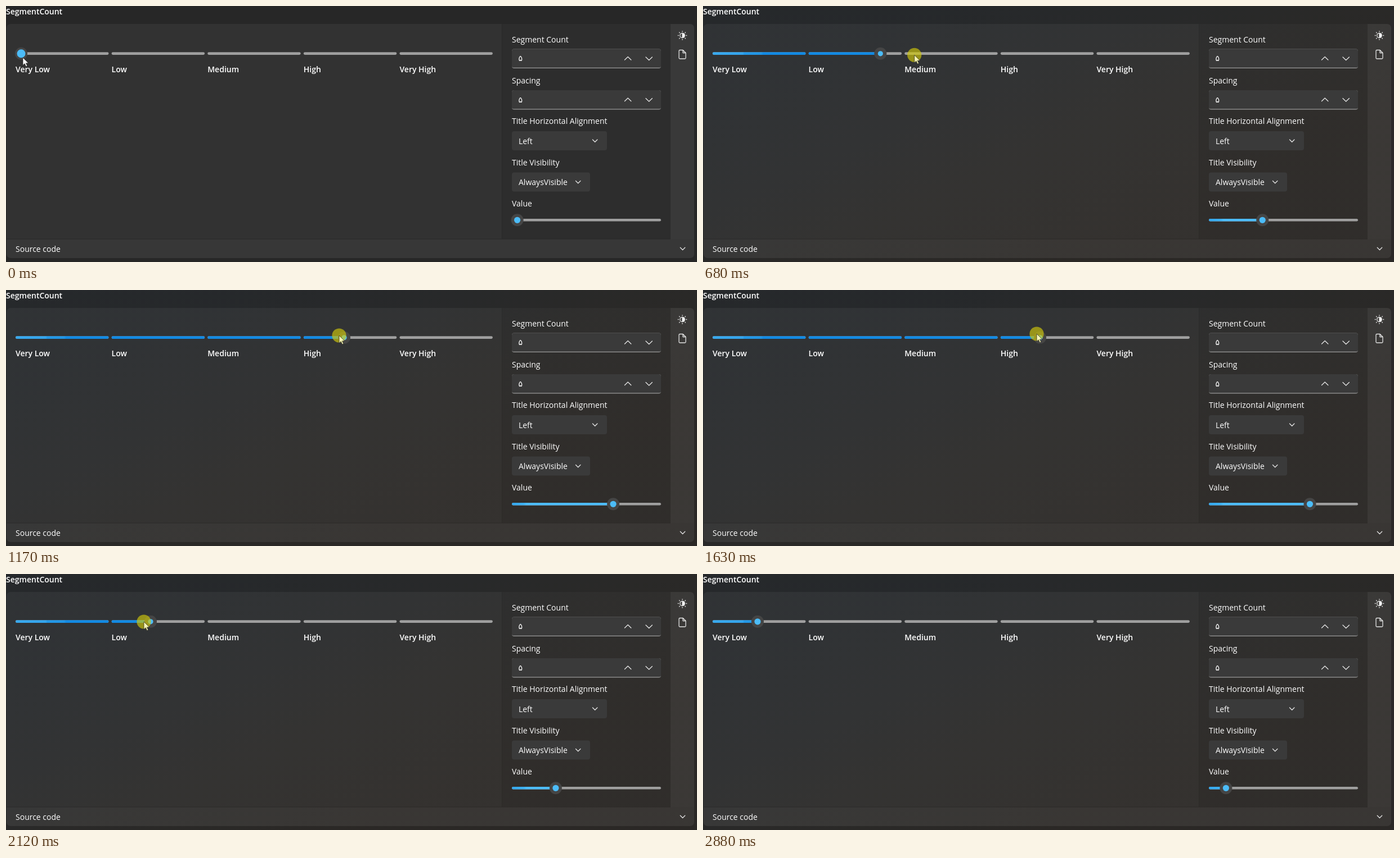
Animation of 1228 by 456 pixels, one loop 3220 ms. Source, as an HTML page:

```html
<!DOCTYPE html>
<html lang="en">
<head>
<meta charset="utf-8">
<title>SegmentCount</title>
<style>
  html, body { margin: 0; width: 100%; height: 100%; overflow: hidden; background: #272727; }
  svg { display: block; width: 1228px; height: 456px; }
  text { font: 14px "Open Sans", "Noto Sans", sans-serif; fill: #fff; }
  .bold { font-weight: 600; }
  .digit { font: 14px "DejaVu Sans", sans-serif; }
  .box { fill: #3a3a3a; }
  .track { fill: #9f9f9f; }
  .ring { fill: #454545; }
  .dot { fill: #4cbcf8; }
  .icon { fill: none; stroke: #e4e4e4; stroke-width: 1.3; stroke-linecap: round; stroke-linejoin: round; }
</style>
</head>
<body>
<svg viewBox="0 0 1228 456">
  <defs>
    <clipPath id="panel"><rect x="1" y="32" width="1222" height="417" rx="7"/></clipPath>
    <clipPath id="segments"></clipPath>
    <clipPath id="valueTrack"><rect x="899" y="379" width="265" height="4.6" rx="2.3"/></clipPath>
    <linearGradient id="mainFill" gradientUnits="userSpaceOnUse" x1="17" x2="117" y1="0" y2="0">
      <stop offset="0" stop-color="#38a9ee"/>
      <stop offset=".54" stop-color="#33a4ec"/>
      <stop offset=".56" stop-color="#2398e6"/>
      <stop offset=".86" stop-color="#2095e5"/>
      <stop offset=".9" stop-color="#128ae3"/>
    </linearGradient>
    <linearGradient id="valueFill" gradientUnits="userSpaceOnUse" x1="899" x2="925" y1="0" y2="0">
      <stop offset="0" stop-color="#35a8ee"/>
      <stop offset=".8" stop-color="#3db1f2"/>
      <stop offset="1" stop-color="#4cbcf8"/>
    </linearGradient>
    <linearGradient id="mica" gradientUnits="userSpaceOnUse" x1="420" y1="0" x2="620" y2="456">
      <stop offset="0" stop-color="#1d3a55" stop-opacity=".09"/>
      <stop offset=".35" stop-color="#33404a" stop-opacity=".08"/>
      <stop offset=".6" stop-color="#4a4030" stop-opacity=".08"/>
      <stop offset="1" stop-color="#4a3018" stop-opacity=".1"/>
    </linearGradient>
  </defs>

  <rect width="1228" height="456" fill="#272727"/>
  <g clip-path="url(#panel)">
    <rect y="32" width="882" height="383" fill="#323232"/>
    <rect x="881" y="32" width="300" height="383" fill="#2d2d2d"/>
    <rect x="1181" y="32" width="43" height="383" fill="#393939"/>
    <rect y="415" width="1228" height="35" fill="#373737"/>
    <path d="M0 415H1181M881.5 32V415" stroke="#292929"/>
  </g>
  <rect id="tint" width="1228" height="456" fill="url(#mica)"/>

  <text class="bold" x="0" y="15">SegmentCount</text>
  <text x="17" y="438">Source code</text>
  <text x="899" y="65">Segment Count</text>
  <text x="899" y="138">Spacing</text>
  <text x="899" y="210">Title Horizontal Alignment</text>
  <text x="899" y="283.5">Title Visibility</text>
  <text x="899" y="357">Value</text>

  <g id="inputs"></g>
  <rect class="box" x="899" y="223" width="169" height="34" rx="4"/>
  <text x="911" y="246">Left</text>
  <rect class="box" x="899" y="296.5" width="139" height="34" rx="4"/>
  <text x="911" y="319">AlwaysVisible</text>

  <g class="icon">
    <path d="M1042.5 238l4.2 4.2l4.2-4.2M1012.5 311.5l4.2 4.2l4.2-4.2M1198.3 430.3l4.2 4.2l4.2-4.2"/>
    <circle cx="1202" cy="52.5" r="4.2"/>
    <path d="M1202 48.5a4 4 0 0 1 0 8z" fill="#fff"/>
    <g id="rays"></g>
    <path d="M1197.5 78.5h5.5l5 5v9a1.5 1.5 0 0 1-1.5 1.5h-9a1.5 1.5 0 0 1-1.5-1.5v-12.500a1.500 1.500 0 0 1 1.500-1.500zM1203 78.500v5h5"/>
  </g>

  <g id="tracks"></g>
  <rect clip-path="url(#segments)" id="mainBar" x="17" y="82" height="6" fill="url(#mainFill)"/>
  <rect class="track" x="899" y="379" width="265" height="4.6" rx="2.3"/>
  <rect clip-path="url(#valueTrack)" id="valueBar" x="899" y="378" height="7" fill="url(#valueFill)"/>

  <g id="mainThumb">
    <circle class="ring" r="11"/>
    <circle class="dot" id="mainDot" r="7.5"/>
  </g>
  <g id="valueThumb">
    <circle class="ring" r="11"/>
    <circle class="dot" r="5.6"/>
  </g>

  <g id="cursor">
    <circle id="halo" r="12.6" fill="#d1ca0b" fill-opacity=".65"/>
    <path id="arrow" d="M0 0V13.600l3.200-3l2.300 5.200l2.300-1l-2.300-5h4.400z" stroke="#222" stroke-width=".7"/>
  </g>
</svg>
<script>
const $ = id => document.getElementById(id);
const LOOP = 3220;

// Static repeated parts
const rect = (i, cls) =>
  `<rect ${cls} x="${17 + i * 170.6}" y="82.3" width="165.5" height="4.6" rx="2.3"/>`;
['Very Low', 'Low', 'Medium', 'High', 'Very High'].forEach((label, i) => {
  $('segments').innerHTML += rect(i, '');
  $('tracks').innerHTML += rect(i, 'class="track"') +
    `<text class="bold" x="${17 + i * 170.6}" y="117.5">${label}</text>`;
});
[76.5, 150].forEach(y => {
  $('inputs').innerHTML += `
    <rect x="899" y="${y}" width="265" height="34.5" rx="4" fill="#9a9a9a"/>
    <path class="box" d="M903 ${y}H1160a4 4 0 0 1 4 4V${y + 31}q0 2.300-4 2.300H903q-4 0-4-2.300V${y + 4}a4 4 0 0 1 4-4z"/>
    <text class="digit" x="910.5" y="${y + 21.5}">\u06F5</text>
    <path class="icon" d="M1099.500 ${y + 19.5}l5.700-5.500l5.700 5.500M1137 ${y + 14.5}l5.700 5.500l5.700-5.500"/>`;
});
for (let a = 0; a < 360; a += 45) {
  $('rays').innerHTML += `<path d="M1202 45.700v-.9" transform="rotate(${a} 1202 52.5)"/>`;
}

// time, cursor x, cursor y, thumb x
const path = [
  [0, 30, 92, 27], [140, 32, 92, 27], [280, 90, 93, 66], [420, 191, 92, 158],
  [540, 283, 90, 242], [750, 422, 86, 352], [960, 538, 83, 461], [1100, 579, 81, 580],
  [1170, 592, 81, 601], [1560, 592, 81, 601], [1630, 593, 78, 599],
  [1770, 520, 81, 545], [1910, 410, 84.5, 442], [2120, 245, 85, 257],
  [2330, 127, 91, 141], [2470, 109, 91, 113], [2670, 104, 91, 97], [LOOP, 104, 91, 97]
];

function tick(t) {
  const run = (from, to) => Math.min(to, from + Math.floor((t - from) / 70) * 70);
  if (t < 480) return run(0, 420);
  if (t < 540) return 480;
  if (t < 1630) return run(540, 1170);
  if (t < 2670) return run(1630, 2610);
  return run(2670, 2880);
}

function pose(t) {
  const n = path.findIndex(p => p[0] > t);
  const a = path[n - 1], b = path[n];
  const k = (t - a[0]) / (b[0] - a[0]);
  return a.map((v, i) => v + (b[i] - v) * k);
}

const move = (id, x, y) => $(id).setAttribute('transform', `translate(${x} ${y})`);
const show = (id, on) => $(id).style.display = on ? '' : 'none';

function draw(now) {
  const t = tick(now % LOOP);
  const [, x, y, thumb] = pose(t);
  const value = 908.6 + (thumb - 27) * 0.297;
  const pressed = t >= 140 && t < 2740;

  move('mainThumb', thumb, 84.8);
  move('valueThumb', value, 381.3);
  move('cursor', x, y);
  $('mainBar').setAttribute('width', thumb - 17);
  $('valueBar').setAttribute('width', value - 899);
  $('mainDot').setAttribute('r', pressed ? 4.6 : t < 140 ? 7.5 : 5.6);
  $('arrow').setAttribute('fill', pressed ? '#f8f6b4' : '#fff');
  show('halo', pressed);
  show('cursor', t < 2880);
  show('tint', t >= 70);
}

let start;
function loop(now) {
  start ??= now;
  draw(now - start);
  requestAnimationFrame(loop);
}
draw(0);
requestAnimationFrame(loop);
</script>
</body>
</html>
```
